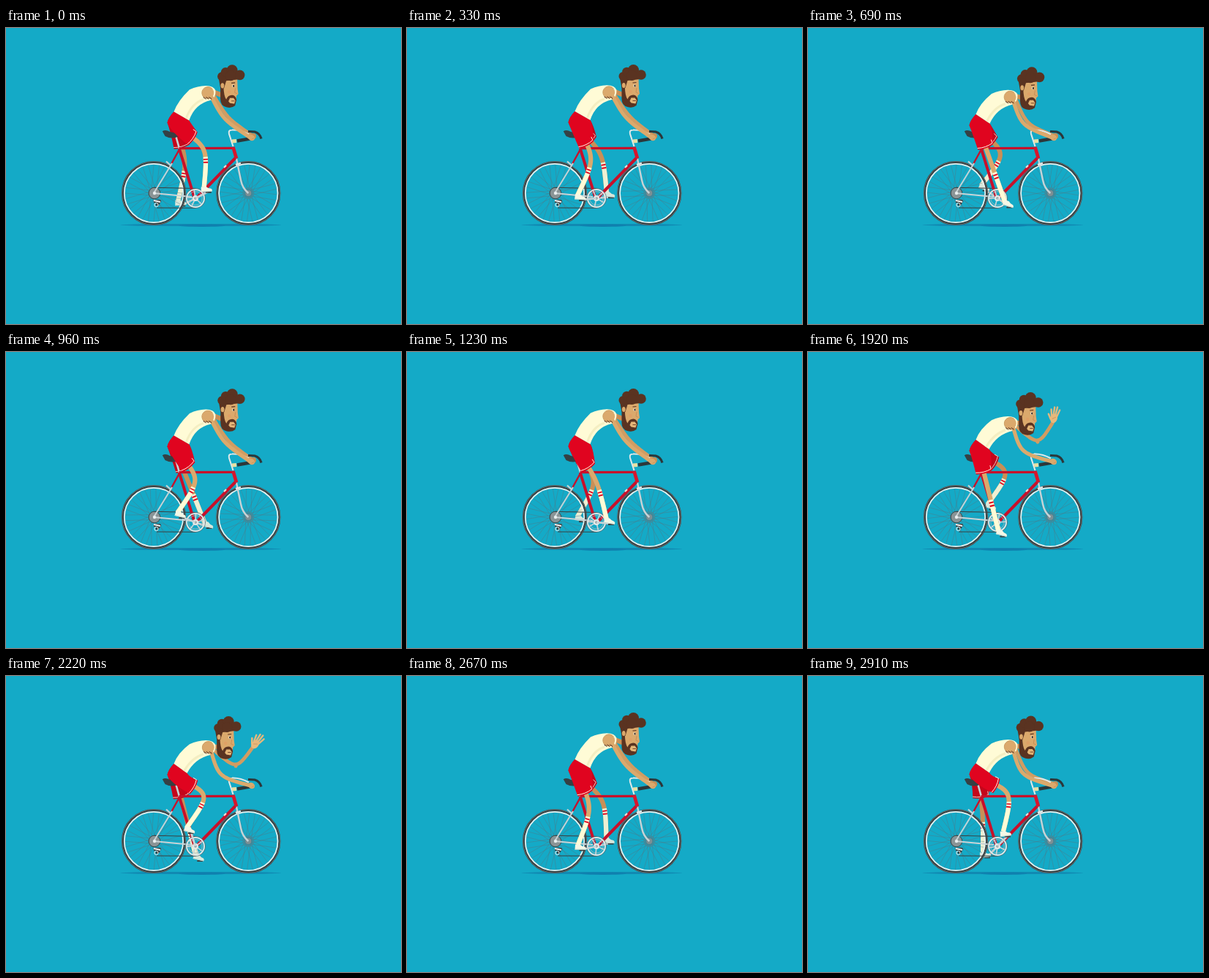
Recreate the animation shown at these times as an HTML page with a canvas. Size 540x405 px, loop 2.94 s.

```html
<!DOCTYPE html>
<html lang="en">
<head>
<meta charset="utf-8">
<title>Cyclist</title>
<style>
html, body { margin: 0; width: 100%; height: 100%; overflow: hidden; background: #14aac7; }
canvas { display: block; width: 540px; height: 405px; }
</style>
</head>
<body>
<canvas id="c" width="540" height="405"></canvas>
<script>
const ctx = document.getElementById('c').getContext('2d');
const LOOP = 2940, STEP = 30, TURNS = 5, TAU = Math.PI * 2;
const SKIN = '#dba96c', SKIN_FAR = '#c98f56', HAIR = '#5a3321', CREAM = '#fffbd6';
const RED = '#e0041f', RED_FAR = '#c4061b', FRAME = '#c8102a', STEEL = '#c8d3d6', DARK = '#3a3f40';
const BB = [259, 233], REAR = [202, 226], FRONT = [331.3, 226], CRANK = 20;

const lerp = (a, b, u) => a + (b - a) * u;
const mix = (p, q, u) => [lerp(p[0], q[0], u), lerp(p[1], q[1], u)];
const polar = (p, r, a) => [p[0] + r * Math.cos(a), p[1] + r * Math.sin(a)];
const smooth = (a, b, t) => {
  const u = Math.min(1, Math.max(0, (t - a) / (b - a)));
  return u * u * (3 - 2 * u);
};

function stroke(color, w) {
  ctx.strokeStyle = color;
  ctx.lineWidth = w;
  ctx.stroke();
}
function line(color, w, ...pts) {
  ctx.beginPath();
  pts.forEach(p => ctx.lineTo(p[0], p[1]));
  stroke(color, w);
}
function poly(color, ...pts) {
  ctx.beginPath();
  pts.forEach(p => ctx.lineTo(p[0], p[1]));
  ctx.closePath();
  ctx.fillStyle = color;
  ctx.fill();
}
function oval(color, x, y, rx, ry = rx, rot = 0) {
  ctx.beginPath();
  ctx.ellipse(x, y, rx, ry, rot, 0, TAU);
  ctx.fillStyle = color;
  ctx.fill();
}
function ring(color, w, p, r) {
  ctx.beginPath();
  ctx.arc(p[0], p[1], r, 0, TAU);
  stroke(color, w);
}
function at(p, rot, draw) {
  ctx.save();
  ctx.translate(p[0], p[1]);
  ctx.rotate(rot);
  draw();
  ctx.restore();
}

// Middle joint of a two-part limb; side picks the bend direction
function joint(a, c, l1, l2, side) {
  const dx = c[0] - a[0], dy = c[1] - a[1], d = Math.hypot(dx, dy);
  const m = d >= l1 + l2 ? d * l1 / (l1 + l2) : (d * d + l1 * l1 - l2 * l2) / (2 * d);
  const h = Math.sqrt(Math.max(0, l1 * l1 - m * m)) * side * (d < l1 + l2);
  return [a[0] + (dx * m + dy * h) / d, a[1] + (dy * m - dx * h) / d];
}
// Rubber-hose limb: a cubic pulled toward its joint, drawn from u0 to u1
function limb(a, b, c, color, w, u0 = 0, u1 = 1) {
  const pts = [];
  for (let i = 0; i <= 24; i++) {
    const u = lerp(u0, u1, i / 24), v = 1 - u;
    pts.push([0, 1].map(k => v * v * v * a[k] + 3 * u * v * b[k] + u * u * u * c[k]));
  }
  line(color, w, ...pts);
}

function wheel(hub, rot) {
  oval('rgba(95,125,134,0.35)', hub[0], hub[1], 8);
  ctx.globalAlpha = 0.7;
  for (let i = 0; i < 32; i++) {
    const a = rot + i * TAU / 32;
    line('#55757f', 0.6, polar(hub, 3.5, a + (i % 2 ? 1.3 : -1.3)), polar(hub, 39, a));
  }
  ctx.globalAlpha = 1;
  ring(DARK, 3, hub, 42.6);
  ring('#8b9698', 0.5, hub, 43.4);
  ring('#e9f0ee', 1.7, hub, 40.2);
  oval('#7d8f94', hub[0], hub[1], 4);
}

function shorts(hip, knee, waist, color, trim) {
  const a = Math.atan2(knee[1] - hip[1], knee[0] - hip[0]);
  const c = polar(hip, 26.5, a);
  const low = polar(c, 11, a + Math.PI / 2), high = polar(c, 10.5, a - Math.PI / 2);
  const [back, front] = waist;
  ctx.beginPath();
  ctx.moveTo(back[0], back[1]);
  ctx.quadraticCurveTo(222, back[1] + 8, 220.5, back[1] + 15);
  ctx.quadraticCurveTo(225, back[1] + 27, low[0], low[1]);
  const mid = polar(c, 3, a);
  ctx.quadraticCurveTo(mid[0], mid[1], high[0], high[1]);
  ctx.quadraticCurveTo(front[0] + 4, front[1] + 6, front[0], front[1]);
  ctx.closePath();
  ctx.fillStyle = color;
  ctx.fill();
  const u = polar(low, -2.2, a), v = polar(high, -2.2, a), m = polar(mid, -2, a);
  ctx.beginPath();
  ctx.moveTo(u[0], u[1]);
  ctx.quadraticCurveTo(m[0], m[1], v[0], v[1]);
  const n = polar(v, -5, a);
  ctx.lineTo(n[0], n[1]);
  stroke(trim, 1);
}

function leg(hip, angle, waist, far) {
  const pedal = polar(BB, CRANK, angle);
  const ankle = [pedal[0] - 6, pedal[1] - 6];
  const knee = joint(hip, ankle, 48, 54, 1);
  const bend = mix(mix(hip, ankle, 0.5), knee, 1.12);
  const skin = far ? SKIN_FAR : SKIN, sock = far ? '#eef0d3' : CREAM;
  line(STEEL, 2.6, BB, pedal);
  line(DARK, 2, [pedal[0] - 4, pedal[1] + 1], [pedal[0] + 4, pedal[1] + 1]);
  limb(hip, bend, ankle, skin, 6.2);
  limb(hip, bend, ankle, sock, 6.2, 0.65, 1);
  for (const u of [0.68, 0.725]) limb(hip, bend, ankle, RED, 6.2, u, u + 0.02);
  at(pedal, 0.1 + 0.22 * Math.sin(2 * angle), () => {
    ctx.beginPath();
    ctx.moveTo(-10, 0);
    ctx.lineTo(-9.5, -7);
    ctx.lineTo(-3, -7);
    ctx.quadraticCurveTo(0, -4, 4, -3.6);
    ctx.quadraticCurveTo(6, -2, 5, 0);
    ctx.closePath();
    ctx.fillStyle = far ? '#d8e8dc' : '#f4f7e6';
    ctx.fill();
    line('#bcd5cf', 1, [-10, -0.2], [5, -0.2]);
  });
  shorts(hip, knee, waist, far ? RED_FAR : RED, far ? '#e8cfc4' : '#fff4e0');
}

function bike(angle, rot) {
  wheel(REAR, rot);
  wheel(FRONT, rot + 0.05);

  // Rear gears and chain
  oval('#8a9496', 203, 226, 7.5);
  ring(DARK, 0.9, [203, 226], 7.8);
  line(DARK, 1, [203, 218.3], [259, 219.5]);
  line(DARK, 1, [206, 246], [259, 246.3]);
  line(STEEL, 1.9, REAR, [254, 231]);
  line(FRAME, 2.4, [237, 166], [226, 186]);
  line(STEEL, 1.9, [227, 185], REAR);
  line(STEEL, 2.2, [219, 182.5], [225, 188]);
  oval('#e9eeee', 203, 226, 2.2);
  line(DARK, 4, [202, 237], [210, 237], [206, 243]);
  line('#f2f5f5', 1.8, [202, 236], [211, 238]);
  ring('#f2f5f5', 1, [205.5, 242], 2.6);

  // Saddle and post
  line(STEEL, 2.6, [232.5, 149], [237, 165]);
  ctx.beginPath();
  ctx.moveTo(213.8, 141.3);
  ctx.quadraticCurveTo(218, 138.5, 224, 142);
  ctx.quadraticCurveTo(231, 144, 238.5, 144.5);
  ctx.quadraticCurveTo(240.5, 147, 236, 148.3);
  ctx.quadraticCurveTo(227, 153, 217.5, 148);
  ctx.closePath();
  ctx.fillStyle = '#354044';
  ctx.fill();

  // Fork
  ctx.beginPath();
  ctx.moveTo(315, 179);
  ctx.lineTo(321, 208);
  ctx.quadraticCurveTo(323, 219, FRONT[0], FRONT[1]);
  stroke(STEEL, 2.4);
  line('#e3e9e8', 2.6, [314, 187], [321, 185]);

  // Frame
  line(FRAME, 3.4, [236.5, 164.6], [311, 164.4]);
  line(FRAME, 4, [236.8, 165], [257.5, 232]);
  line(FRAME, 4, [313.5, 178], [261, 232]);
  line('#d8152c', 4.6, [310.5, 163], [315, 178.5]);
  line('#f5dfd6', 2.2, [298, 191], [301, 188]);

  // Bars
  ctx.beginPath();
  ctx.moveTo(310.5, 162);
  ctx.lineTo(305, 145);
  ctx.quadraticCurveTo(303.5, 139.5, 309, 139.5);
  ctx.quadraticCurveTo(320, 139, 332, 145.5);
  stroke('#e0e9e9', 2.1);
  line('#e9e0a4', 5, [309, 155], [315, 154.5]);
  line('#2c373a', 4.6, [316, 154.5], [336, 151]);
  ctx.beginPath();
  ctx.moveTo(331, 141.5);
  ctx.lineTo(340, 142);
  ctx.quadraticCurveTo(347, 144, 349, 151.5);
  stroke('#2c373a', 3.2);

  // Chainring
  ring('#59666a', 0.8, BB, 13.6);
  ring('#dde5e5', 1.9, BB, 12);
  ring('#a9b6b8', 0.9, BB, 9.3);
  for (let i = 0; i < 5; i++) line(STEEL, 1.7, BB, polar(BB, 11, angle + i * TAU / 5));
  oval('#e3e9e8', BB[0], BB[1], 4);
  oval('#8b999b', BB[0], BB[1], 1.7);
}

function torso(waist, s) {
  const [b, f] = waist;
  ctx.beginPath();
  ctx.moveTo(b[0], b[1]);
  ctx.quadraticCurveTo(235, b[1] - 15, 251, s[1] - 4.5);
  ctx.quadraticCurveTo(262, s[1] - 9.5, 273, s[1] - 9.8);
  ctx.quadraticCurveTo(284, s[1] - 10, 286.5, s[1] - 3);
  ctx.quadraticCurveTo(287, s[1] + 6, 280, s[1] + 10);
  ctx.quadraticCurveTo(258, s[1] + 15, f[0], f[1]);
  ctx.closePath();
  ctx.fillStyle = CREAM;
  ctx.fill();
  // Soft shade along the belly
  ctx.beginPath();
  ctx.moveTo(f[0] - 4, f[1] - 3);
  ctx.quadraticCurveTo(254, s[1] + 14, 270, s[1] + 9);
  stroke('#f4eec2', 3);
}

function head(p, s) {
  line(SKIN_FAR, 6.5, [s[0] + 8, s[1] - 1], [p[0] + 299, p[1] + 93]);
  at(p, 0, () => {
    poly(SKIN, [295, 67], [316, 67], [316.5, 83], [317.5, 90], [315, 92.5], [314, 102], [308, 107], [297, 104]);
    // Beard with mouth
    ctx.beginPath();
    ctx.moveTo(293, 76);
    ctx.lineTo(297.3, 80);
    ctx.quadraticCurveTo(297.6, 93, 301, 97.5);
    ctx.quadraticCurveTo(303, 91.5, 309, 91.5);
    ctx.quadraticCurveTo(314, 92, 315, 98);
    ctx.lineTo(313, 106);
    ctx.quadraticCurveTo(308, 110, 301, 108);
    ctx.quadraticCurveTo(293, 106, 293, 97);
    ctx.closePath();
    ctx.fillStyle = HAIR;
    ctx.fill();
    poly('#e4b577', [304, 100], [306, 95.5], [311, 95.5], [313.5, 99], [312, 103.5], [306, 102.5]);
    line('#6e3a24', 0.9, [308, 99.5], [312.5, 99.5]);
    // Hair
    poly(HAIR, [290, 65], [322, 62], [318, 70], [301, 72], [298, 82], [293, 82]);
    for (const [x, y, r] of [[295, 66, 6], [300, 60, 6.3], [309, 57.5, 7.5], [319.5, 64, 6.8], [307, 65, 7]]) oval(HAIR, x, y, r);
    oval(SKIN, 295.8, 78.5, 2.4, 3.6);
    oval('#f6ead0', 310.6, 79, 1.6, 2);
    oval('#2f2018', 311, 79, 1, 1.6);
    line(HAIR, 1.2, [308, 75], [313, 74.5]);
    line(SKIN_FAR, 1, [313.5, 82], [312.5, 88], [316, 89.5]);
    oval('#e0a066', 305, 87, 2.2);
  });
}

function farArm(s, t) {
  const up = smooth(1290, 1560, t) * (1 - smooth(2310, 2580, t));
  const swing = -Math.cos((t - 1590) / 420 * TAU);
  const start = [s[0] + 8, s[1] + 4], grip = [338, 148];
  const rest = joint(start, grip, 37, 42, -1);
  const elbow = mix(rest, [315, 128], up);
  const restLen = Math.hypot(grip[0] - rest[0], grip[1] - rest[1]);
  const restAngle = Math.atan2(grip[1] - rest[1], grip[0] - rest[0]);
  const wrist = polar(elbow, lerp(restLen, 37, up), lerp(restAngle, -1 + 0.06 * swing, up));
  limb(start, elbow, wrist, '#d29c61', 4.8);
  const tip = mix(mix(start, wrist, 0.5), elbow, 0.8);
  oval('#d29c61', tip[0], tip[1] + 1, 2.4);
  if (up < 0.15) {
    oval(SKIN_FAR, wrist[0], wrist[1], 4);
    return;
  }
  at(wrist, lerp(restAngle, -1.24 + 0.34 * swing, up), () => {
    oval('#e6b87c', 6, 0, 6.5, 4.8);
    [[9, -4, 17, -6.5], [10, -1.6, 21, -2.8], [10, 1, 22, 1], [9, 3.2, 19, 5]].forEach(q =>
      line('#e6b87c', 2.4, [q[0], q[1]], [q[2], q[3]]));
    line('#e6b87c', 2.5, [4, -4], [10, -8.5]);
    line(SKIN_FAR, 0.7, [5, -2], [8, 2]);
  });
}

function nearArm(s) {
  const grip = [334, 150];
  const start = [s[0] + 3, s[1] + 2];
  const elbow = joint(start, grip, 39, 44, -1);
  const bend = mix(mix(start, grip, 0.5), elbow, 1.12);
  oval(SKIN, s[0], s[1], 8.2);
  limb(start, bend, grip, SKIN, 5.2);
  ctx.beginPath();
  ctx.arc(s[0], s[1], 8.2, 2.2, 5.6);
  stroke('#c99a5f', 0.9);
  for (let i = 0; i < 6; i++) {
    const x = s[0] - 6 + i * 1.9, y = s[1] + 5.5 + (i % 2);
    line(HAIR, 1, [x, y], [x + 1.3, y + 2.4]);
  }
  oval(SKIN, 335.5, 150, 4.8, 4, 0.6);
  line(SKIN_FAR, 0.8, [335.5, 152.5], [339, 150.5]);
}

function draw(t) {
  const angle = -0.48 + t / LOOP * TURNS * TAU;
  const low = smooth(0.1, 0.55, Math.sin(angle + 0.05) ** 2);
  const waist = [[229.5, 114 + 6 * low], [250.5 - 3 * low, 126 + 7 * low]];
  const hip = [234, 136 + 3 * low];
  const shoulder = [276 + 0.5 * low, 88 + 9.7 * low];

  ctx.fillStyle = '#14aac7';
  ctx.fillRect(0, 0, 540, 405);
  oval('#1189b2', 266.3, 269.5, 110, 1.6);
  oval('#0f7fae', 268, 270.3, 32, 1.6);

  ctx.lineCap = ctx.lineJoin = 'round';
  farArm(shoulder, t);
  ctx.lineCap = 'butt';
  leg([hip[0] - 1, hip[1] + 1], angle + Math.PI, waist, true);
  bike(angle, t / LOOP * 12 * TAU);
  leg(hip, angle, waist, false);
  head([0.5 - 5.3 * low, 5 * low], shoulder);
  torso(waist, shoulder);
  nearArm(shoulder);
}

const begin = performance.now();
function tick() {
  const t = (performance.now() - begin) % LOOP;
  draw(Math.floor(t / STEP) * STEP);
  requestAnimationFrame(tick);
}
tick();
</script>
</body>
</html>
```
